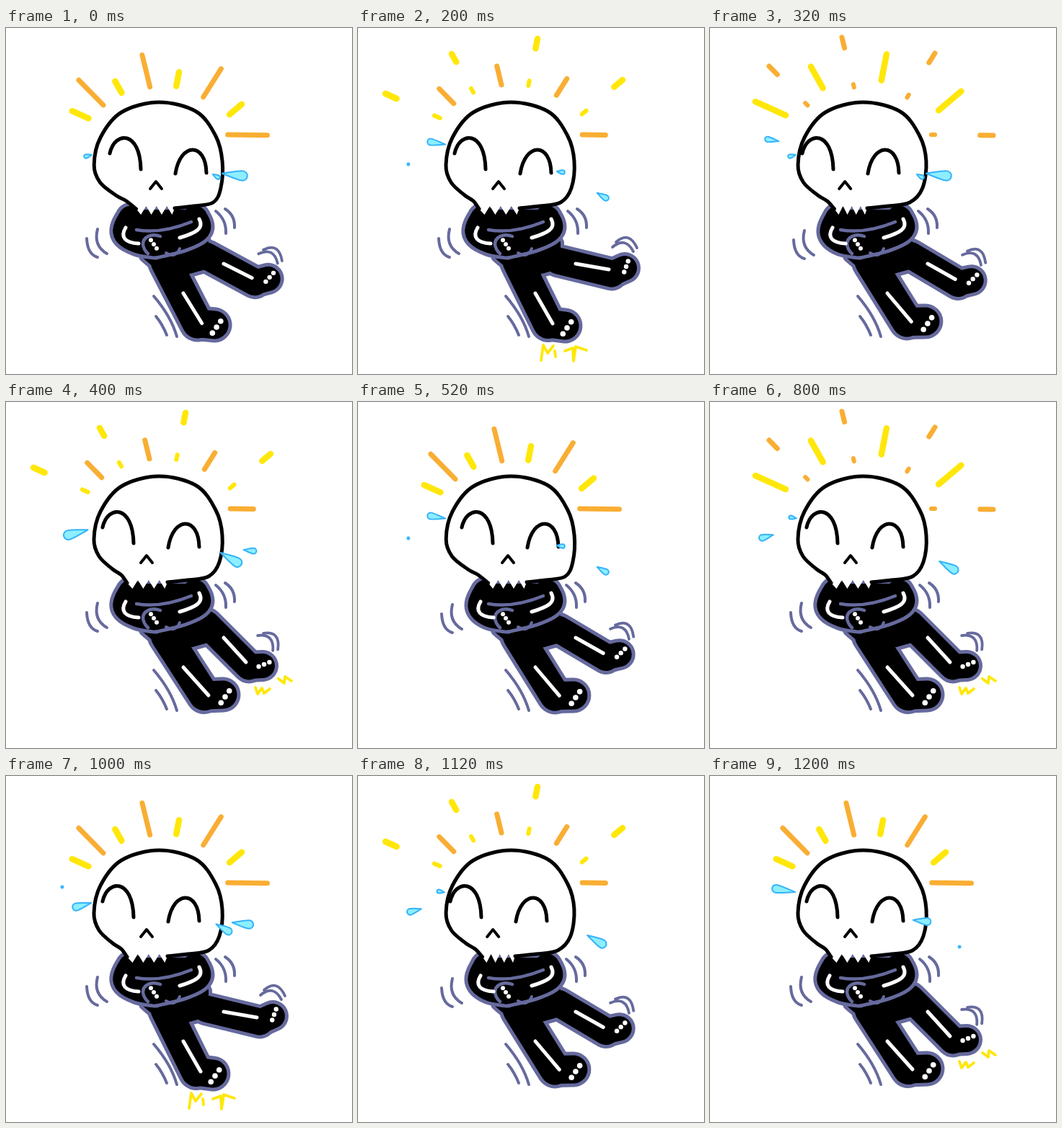
These frames come from a looping animation (480 px wide and 480 px high, 1240 ms). An HTML page:

```html
<!DOCTYPE html>
<html lang="en">
<head>
<meta charset="utf-8">
<title>Laughing skeleton</title>
<style>
html, body { margin: 0; width: 100%; height: 100%; overflow: hidden; background: #fff; }
svg { display: block; width: 100vw; height: 100vh; }
</style>
</head>
<body>
<svg id="stage" viewBox="0 0 480 480" fill="none" stroke-linecap="round" stroke-linejoin="round"></svg>
<script>
const STEP = 40, COUNT = 31;
const PURPLE = '#666a9d', YELLOW = '#ffe70a', ORANGE = '#f9ae33';
const stage = document.getElementById('stage');

const mix = (a, b, t) => a + (b - a) * t;
const blend = (p, q, t) => p.map((v, i) => mix(v, q[i], t));
const add = ([x, y], dx, dy) => [x + dx, y + dy];
const path = (d, stroke, width, fill = 'none') =>
  `<path d="${d}" stroke="${stroke}" stroke-width="${width}" fill="${fill}"/>`;
const place = (x, y, turn, inner) =>
  `<g transform="translate(${x},${y}) rotate(${turn})">${inner}</g>`;

// Open smooth curve through points
function smooth(p) {
  const at = i => p[Math.max(0, Math.min(p.length - 1, i))];
  let d = 'M' + p[0];
  for (let i = 0; i < p.length - 1; i++) {
    const [a, b, c, e] = [at(i - 1), at(i), at(i + 1), at(i + 2)];
    d += `C${b.map((v, j) => v + (c[j] - a[j]) / 6)} ${c.map((v, j) => v - (e[j] - b[j]) / 6)} ${c}`;
  }
  return d;
}

// Black limbs sharing one purple outline
function limbs(list) {
  const layer = (color, extra) => list.map(([d, w]) =>
    path(d, color, w + extra, d.endsWith('Z') ? color : 'none')).join('');
  return layer(PURPLE, 10) + layer('#000', 0);
}

// Three white dots in a slanted row
function dots([x, y], angle, gap, r) {
  const a = angle * Math.PI / 180;
  return [-1, 0, 1].map(k =>
    `<circle cx="${x + k * gap * Math.cos(a)}" cy="${y + k * gap * Math.sin(a)}" r="${r}" fill="#fff"/>`).join('');
}

// lean turns the face; l and r swing each leg from kicked left to kicked right
const poses = [
  { lean: 0, l: 1, r: 1, sparks: 'M346,396L349,405L355,397L358,404L366,398M378,384L386,390L387,381L396,387' },
  { lean: 1, l: .15, r: .45 },
  { lean: 1, l: .85, r: .52, shift: 4 },
  { lean: 0, l: 0, r: 0, sparks: 'M254,461L257,440L263,451L271,441M273,448L274,456M287,448L298,444L299,462L302,442L317,447' },
  { lean: -.6, l: .85, r: .52, shift: 4 }
];

function drawLegs({ l, r, sparks }) {
  const heelL = blend([264, 410], [275, 407], l), toeL = blend([287, 413], [301, 406], l);
  const heelR = blend([352, 341], [337, 367], r), toeR = blend([370, 333], [356, 366], r);
  const hipR = [278, mix(323, 308, r)];
  const mark = 'M-15,6Q3,-10 14,14M-20,13Q-2,-2 9,19';
  return limbs([
    ['M194,316L276,298L276,330L240,340L222,340Z', 10],
    [`M222,325L${heelL}`, 42], [`M${heelL}L${toeL}`, 39],
    [`M${hipR}L${heelR}`, 37], [`M${heelR}L${toeR}`, 34]
  ]) +
    path(`M246,368L${add(heelL, 6, 0)}M302,327L${add(heelR, -4, -6)}`, '#fff', 5) +
    dots(add(toeL, 3, 3), -55, 10, 3.8) +
    dots(add(toeR, 2, -2), -70 + 48 * r, 8, 3.2) +
    place(373, 291 + 33 * r, 33 * r, path(mark, PURPLE, 3.8)) +
    (sparks ? path(sparks, YELLOW, 3.8) : '');
}

function drawArms(shift) {
  const x = v => v + shift;
  return limbs([
    ['M182,256L258,256L258,284L190,290Z', 8],
    [smooth([[x(174), 265], [x(167), 283], [184, 294], [206, 298]]), 37],
    [smooth([[262, 264], [266, 278], [242, 290], [210, 298]]), 35]
  ]) +
    path('M181,280Q215,286 257,269', PURPLE, 4.5) +
    path('M214,289C200,284 190,291 190,300Q191,308 197,313', PURPLE, 4.5) +
    path('M222,312Q235,320 241,306', PURPLE, 4) +
    path(`M${x(166)},277C${x(158)},290 ${x(165)},298 ${x(184)},299`, '#fff', 5) +
    path('M268,265C275,278 264,284 241,291', '#fff', 5) +
    dots([205, 300], 55, 7, 3);
}

function drawShakes(shift) {
  return place(shift, shift / 2, 0, path('M127,279Q121,302 140,313M112,292Q113,314 127,318', PURPLE, 4)) +
    place(-shift / 2, 0, 0, path('M291,254Q306,266 305,285M304,251Q318,260 317,277', PURPLE, 4)) +
    path('M205,372Q229,400 237,428M208,400Q217,411 223,426', PURPLE, 4);
}

// Half-round eye whose two ends drop a and b below its top
function eye(x, y, a, b) {
  const top = -(a + b) / 6;
  return place(x, y, 0, path(`M-22,${a}C-15,${top} 20,${top} 21,${b}`, '#000', 5));
}

function drawHead(lean) {
  const outline = [[224, 250], [252, 247], [281, 242], [296, 222], [300, 185], [291, 150], [264, 116],
    [212, 103], [160, 117], [131, 152], [122, 190], [129, 214], [148, 232], [160, 240], [168, 251]];
  // Only the jaw slides with the face
  const skull = smooth(outline.map(([x, y]) => {
    const slide = x < 200 ? 12 * lean * lean : 10 * lean;
    return [x + slide * ((y - 100) / 150) ** 8, y];
  }));
  const from = 168 + 12 * lean * lean, to = 224 + 10 * lean;
  let teeth = '';
  for (let i = 1; i < 8; i++) teeth += `L${mix(from, to, i / 7.5)},${i % 2 ? 259 : 247}`;
  const dx = 10 * lean;
  return path(skull + teeth + 'Z', 'none', 0, '#fff') + path(skull, '#000', 5) +
    eye(156 + dx, 153, 21, 43) + eye(247 + dx, 169, 33, 32) +
    path(`M${187 + dx * 1.3},223l8,-10l8,10`, '#000', 4);
}

// Spokes run from near the skull to where the burst ends
const spokes = [
  [ORANGE, [136, 108], [82, 53]], [ORANGE, [200, 83], [183, 13]],
  [ORANGE, [273, 97], [312, 35]], [ORANGE, [306, 148], [393, 149]],
  [YELLOW, [116, 126], [38, 91]], [YELLOW, [161, 91], [130, 36]],
  [YELLOW, [236, 82], [249, 15]], [YELLOW, [309, 121], [367, 72]]
];
// Lit stretches of a spoke in each stage of the burst
const bursts = {
  [ORANGE]: [[[.02, .65]], [[.01, .07], [.79, 1]], [[.06, .43]]],
  [YELLOW]: [[[.02, .31]], [[.14, .68]], [[.03, .13], [.8, 1]]]
};
function drawRays(stageNo) {
  return spokes.map(([color, near, far]) => bursts[color][stageNo].map(([a, b]) =>
    path(`M${blend(near, far, a)}L${blend(near, far, b)}`, color, b < .2 ? 6 : color === YELLOW ? 8.5 : 7)
  ).join('')).join('');
}

const tears = [
  { start: 0, life: 5, from: [111, 178], to: [70, 189], size: 5 },
  { start: 4, life: 5, from: [112, 160], to: [78, 154], size: 4, late: true },
  { start: 5, life: 6, from: [284, 200], to: [346, 207], size: 5.2 },
  { start: 0, life: 6, from: [294, 207], to: [346, 237], size: 5.2 }
];

// Each tear slows as it flies, swelling and then shrinking to a dot
function drawTear({ start, life, from, to, size, late }, i) {
  const age = (i - start + 8) % 8;
  if (age > life || (late && i < start)) return '';
  const f = age / life, swell = Math.sin(Math.PI * mix(.08, 1, f));
  const [x, y] = blend(from, to, 1 - (1 - f) ** 1.8);
  const r = 1.5 + size * swell, tail = r + 22 * swell;
  const turn = Math.atan2(to[1] - from[1], to[0] - from[0]) * 180 / Math.PI;
  return place(x, y, turn, path(
    `M${-tail},0C${-tail * .6},${-r * .45} ${-r},${-r} 0,${-r}A${r},${r} 0 0 1 0,${r}C${-r},${r} ${-tail * .6},${r * .45} ${-tail},0Z`,
    '#35b3fa', 2, '#8deeff'));
}

function draw(i) {
  // The loop opens on the beat that follows its last step
  const beat = i || COUNT;
  const pose = poses[Math.floor((beat + 1) / 2) % poses.length];
  const shift = pose.shift || 0;
  stage.innerHTML = drawRays(Math.floor(i % 6 / 2)) + drawLegs(pose) + drawArms(shift) +
    drawShakes(shift) + drawHead(pose.lean) + tears.map(t => drawTear(t, i)).join('');
}

let shown = 0;
const began = performance.now();
function tick(now) {
  const i = Math.floor(Math.max(0, now - began) / STEP) % COUNT;
  if (i !== shown) draw(shown = i);
  requestAnimationFrame(tick);
}
draw(0);
requestAnimationFrame(tick);
</script>
</body>
</html>
```
